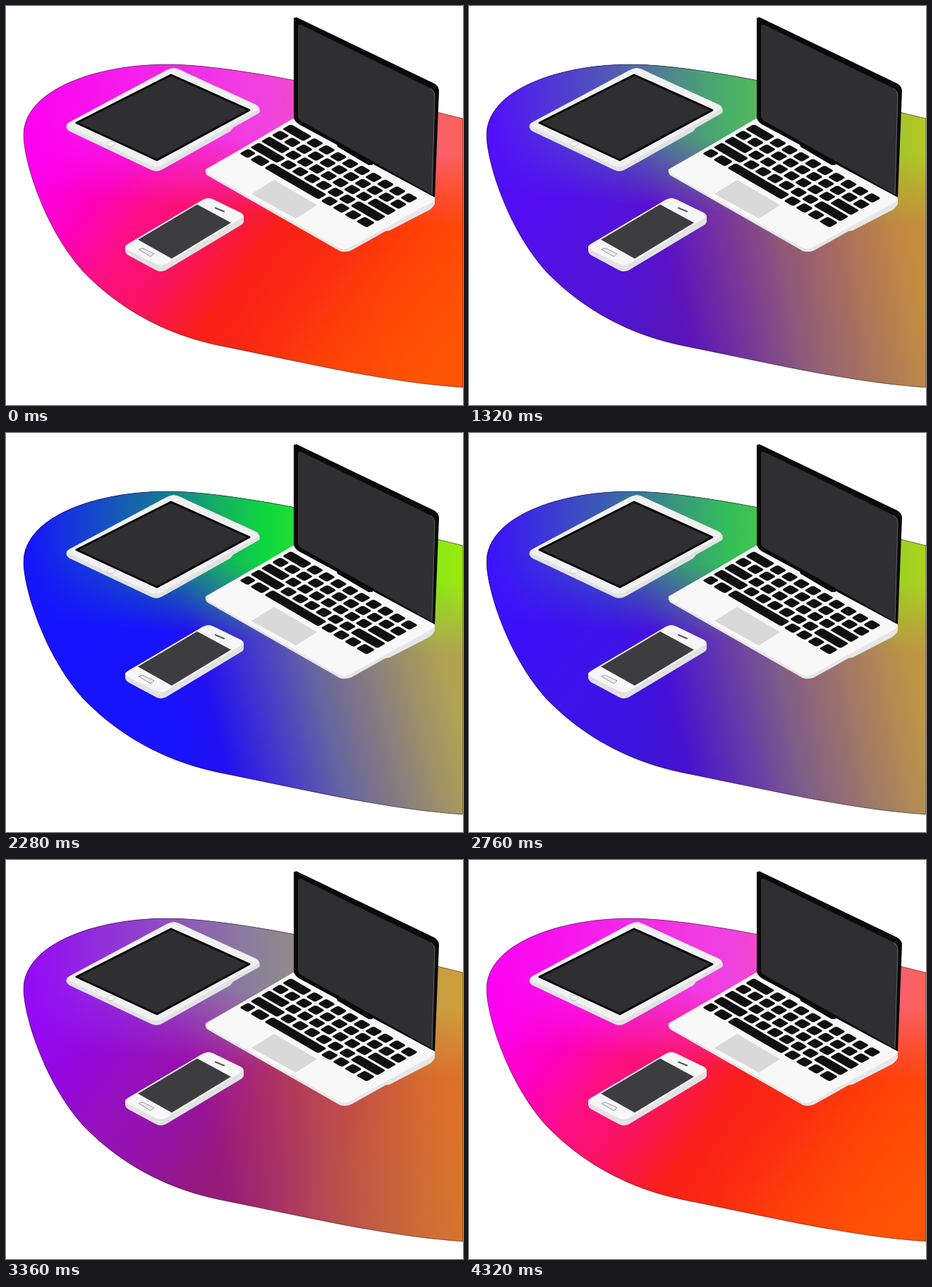
Animation, 648 px wide and 567 px high, one loop 4440 ms. Source, as an HTML page:

```html
<!DOCTYPE html>
<html lang="en">
<head>
<meta charset="utf-8">
<title>Devices on a shifting gradient</title>
<style>
  html, body { margin: 0; width: 100%; height: 100%; overflow: hidden; background: #fff; }
  svg { display: block; width: 100%; height: 100%; }
</style>
</head>
<body>
<svg viewBox="0 0 648 567" xmlns="http://www.w3.org/2000/svg">
  <defs>
    <linearGradient id="warmBase" gradientUnits="userSpaceOnUse" x1="0" y1="0" x2="640" y2="480">
      <stop offset=".21" stop-color="#ff00f0"/>
      <stop offset=".325" stop-color="#ff00be"/>
      <stop offset=".415" stop-color="#ff0f87"/>
      <stop offset=".52" stop-color="#fc145c"/>
      <stop offset=".62" stop-color="#fa2018"/>
      <stop offset=".74" stop-color="#fc2e0f"/>
      <stop offset=".81" stop-color="#ff3e08"/>
      <stop offset=".98" stop-color="#ff5405"/>
    </linearGradient>
    <linearGradient id="warmTop" gradientUnits="userSpaceOnUse" x1="0" y1="0" x2="648" y2="0">
      <stop offset=".04" stop-color="#ff00f0"/>
      <stop offset=".31" stop-color="#f523eb"/>
      <stop offset=".57" stop-color="#f241e1"/>
      <stop offset=".77" stop-color="#f555a5"/>
      <stop offset="1" stop-color="#fc625a"/>
    </linearGradient>
    <linearGradient id="coolBase" gradientUnits="userSpaceOnUse" x1="0" y1="0" x2="600" y2="-150">
      <stop offset=".2" stop-color="#1414ff"/>
      <stop offset=".3" stop-color="#200ff5"/>
      <stop offset=".45" stop-color="#4a41c6"/>
      <stop offset=".56" stop-color="#6669a0"/>
      <stop offset=".61" stop-color="#767092"/>
      <stop offset=".85" stop-color="#b2a554"/>
    </linearGradient>
    <linearGradient id="coolTop" gradientUnits="userSpaceOnUse" x1="0" y1="0" x2="648" y2="0">
      <stop offset=".04" stop-color="#1414ff"/>
      <stop offset=".2" stop-color="#144bc8"/>
      <stop offset=".31" stop-color="#146ea0"/>
      <stop offset=".46" stop-color="#12af64"/>
      <stop offset=".57" stop-color="#0cda3c"/>
      <stop offset=".77" stop-color="#50e823"/>
      <stop offset="1" stop-color="#9beb0f"/>
    </linearGradient>
    <linearGradient id="fade" gradientUnits="userSpaceOnUse" x1="0" y1="160" x2="-8.3" y2="264">
      <stop offset="0" stop-color="#fff"/>
      <stop offset="1" stop-color="#000"/>
    </linearGradient>
    <mask id="topMask" maskUnits="userSpaceOnUse" x="0" y="0" width="648" height="567">
      <path d="M0 0H648V567H0Z" fill="url(#fade)"/>
    </mask>
    <path id="blob" d="M648 160C560 138 340 83 228 83C130 83 25 118 25 184C25 215 50 310 109 377C160 430 225 466 300 482C420 506 540 535 648 542Z"/>
  </defs>

  <g id="warm">
    <use href="#blob" fill="url(#warmBase)"/>
    <use href="#blob" fill="url(#warmTop)" mask="url(#topMask)"/>
  </g>
  <g id="cool" opacity="0">
    <use href="#blob" fill="url(#coolBase)"/>
    <use href="#blob" fill="url(#coolTop)" mask="url(#topMask)"/>
  </g>
  <use href="#blob" fill="none" stroke="#000" stroke-opacity=".45"/>

  <g id="tablet">
    <path fill="#e2e2e4" d="M228 92Q237 86 245 90L355 141Q362 146 359 152L322 173L318 178L222 232Q214 237 206 233L90 178Q83 173 87 167Z"/>
    <path fill="#f1f1f1" d="M228 91Q237 86 245 90L354 140Q361 144 356 148L221 226Q213 230 205 227L91 172Q84 169 90 165Z"/>
    <path fill="#2f2f31" stroke="#070707" stroke-width="3" stroke-linejoin="round" d="M234 98L345 148L214 219L100 166Z"/>
    <ellipse cx="149" cy="196" rx="5.5" ry="3.8" fill="#f6f6f6" stroke="#c4c4c6"/>
  </g>

  <g id="phone">
    <path fill="#e2e2e4" d="M278 276Q286 271 294 275L333 294Q338 297 337 301V307Q336 310 332 312L229 374Q221 380 212 375L173 354Q169 351 169 347V341Z"/>
    <path fill="#f7f7f7" d="M278 276Q286 271 294 275L333 294Q339 298 333 302L228 366Q221 370 213 367L172 346Q167 342 173 338Z"/>
    <path fill="#3d3d3f" d="M271 282L319 308L235 359L187 332Z"/>
    <path d="M297 287L309 292" stroke="#55555a" stroke-width="2" stroke-linecap="round"/>
    <path fill="#ececee" stroke="#98989c" stroke-linejoin="round" d="M188 346L193 344L210 352L205 356Z"/>
  </g>

  <g id="laptop">
    <path fill="#e6e6e8" d="M407 161L608 271V281Q606 286 600 290L544 319L538 320L490 347Q481 351 473 348L286 241Q282 238 283 232Z"/>
    <path fill="#f8f8f8" d="M407 160L608 272Q607 278 600 281L489 342Q481 347 473 344L286 238Q281 235 287 231Z"/>
    <path fill="#0a0a0b" d="M408 17L412 16L607 110Q614 114 614 121L608 272L415 168Q408 163 408 157Z"/>
    <path fill="#2f2f31" d="M414 30Q414 25 419 27L602 117Q608 121 608 127L604 268L418 163Q414 160 414 156Z"/>
    <path fill="none" stroke="#77777a" stroke-width=".8" d="M602 117Q608 121 608 127L604 268"/>
    <path fill="#0a0a0b" d="M468 193L519 221L520 226L514 226L470 200Z"/>
    <path fill="#d9d9da" d="M380 247L441 283L411 302L348 267Z"/>
    <g id="keys" fill="#101011" transform="matrix(16.7 9.75 -15.2 8.7 403.7 166)"></g>
  </g>
</svg>
<script>
  const LOOP = 4440, STEP = 120;
  const cool = document.getElementById('cool');
  const keys = document.getElementById('keys');

  // Key widths per row, in units along the keyboard's long side.
  const singles = n => Array(n).fill(1);
  const rows = [
    [2, ...singles(9)],
    singles(11),
    [2, ...singles(7), 2],
    [2.5, ...singles(6), 2.5],
    [0.9, 1.2, 4.8, ...singles(3), 1.1]
  ];

  function addKey(x, y, width) {
    const key = document.createElementNS('http://www.w3.org/2000/svg', 'rect');
    const box = { x: x + 0.11, y: y + 0.1, width: width - 0.22, height: 0.8, rx: 0.16 };
    for (const name in box) key.setAttribute(name, box[name]);
    keys.append(key);
  }

  rows.forEach((widths, y) => {
    let x = 0;
    for (const width of widths) {
      addKey(x, y, width);
      x += width;
    }
  });

  // Cosine crossfade, advanced in discrete steps.
  function draw() {
    const step = Math.floor((performance.now() % LOOP) / STEP);
    const wave = (1 + Math.cos((step - 17.7) * Math.PI / 18)) / 2;
    cool.setAttribute('opacity', Math.pow(wave, 0.85).toFixed(3));
    requestAnimationFrame(draw);
  }
  draw();
</script>
</body>
</html>
```
